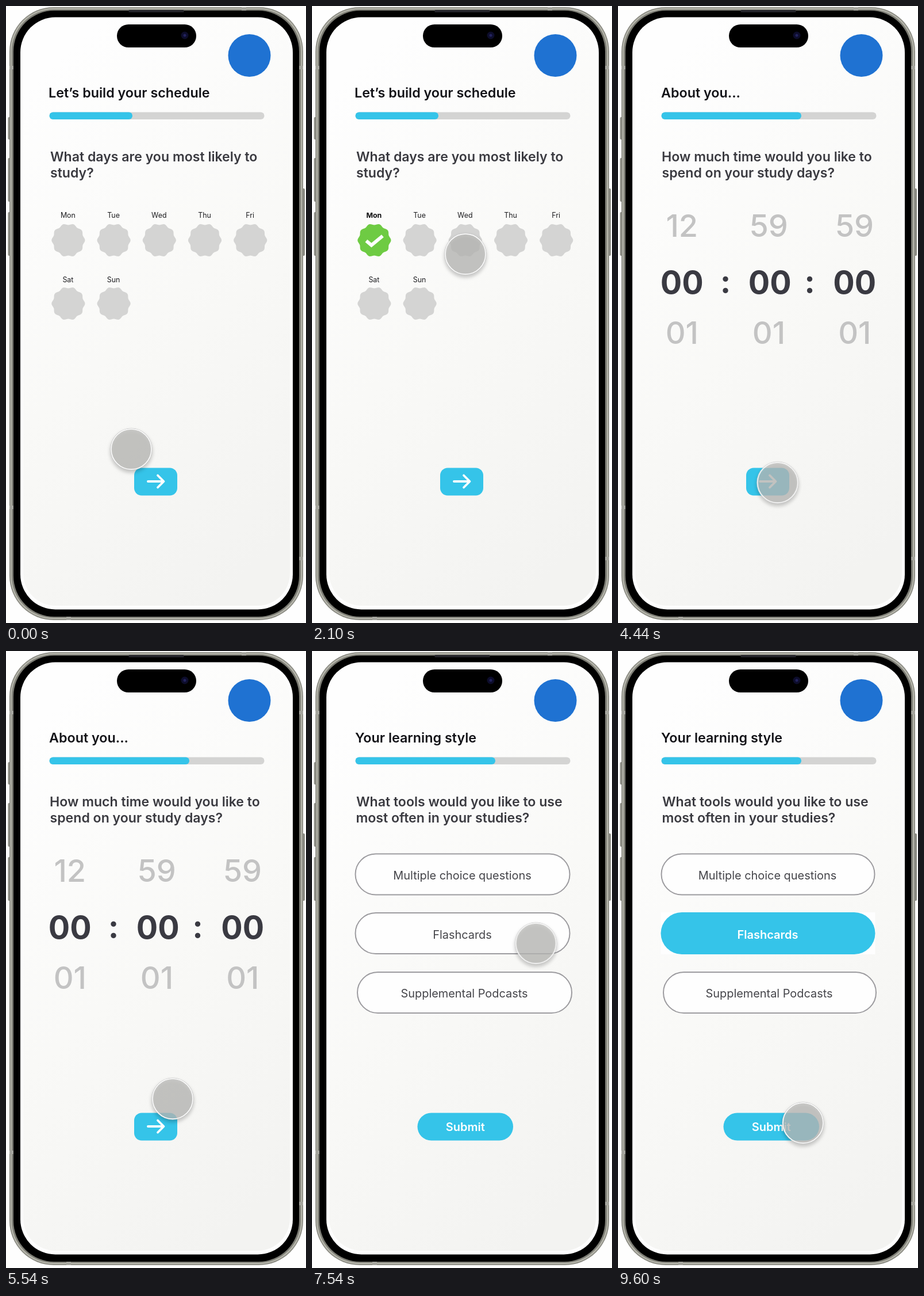
Animation, 522 px wide and 1072 px high, one loop 9.63 s. Source, as an HTML page:

```html
<!DOCTYPE html>
<html lang="en">
<head>
<meta charset="utf-8">
<title>Study planner</title>
<style>
  html, body { margin: 0; width: 100%; height: 100%; overflow: hidden; background: #fefefe; }
  svg { display: block; width: 100vw; height: 100vh; font-family: Inter, sans-serif; font-optical-sizing: none; }

  .title { font-size: 23.3px; font-weight: 600; fill: #121217; }
  .question { font-size: 23.1px; font-weight: 600; fill: #3a3a40; }
  .mid { text-anchor: middle; }
  .day { font-size: 12.4px; fill: #1d1d20; }
  .picked { font-weight: 700; fill: #0c0c0e; }
  .option { font-size: 19.9px; fill: #45454a; }
  .pill { fill: #fefefe; stroke: #9c9b9f; stroke-width: 2; }
  .strong { font-size: 20px; font-weight: 600; fill: #fff; }
  .now { font-size: 55.5px; font-weight: 650; fill: #3a3a42; }
  .near { font-size: 54px; font-weight: 500; fill: #c3c3c3; }
  .cyan { fill: #35c4e9; }
  .track { fill: #d4d4d3; }
  .tick, .arrow { fill: none; stroke: #fff; }
  .tick { stroke-width: 6; }
  .arrow { stroke-width: 3.8; stroke-linecap: round; stroke-linejoin: round; }

  .step { animation: 9630ms step-end infinite; }
  .until-mon { animation-name: until-mon; }
  .from-mon { animation-name: from-mon; }
  .until-wed { animation-name: until-wed; }
  .from-wed { animation-name: from-wed; }
  .days-page { animation-name: days-page; }
  .time-page { animation-name: time-page; }
  .tools-page { animation-name: tools-page; }
  .until-card { animation-name: until-card; }
  .from-card { animation-name: from-card; }
  @keyframes until-mon { 0% { opacity: 1 } 12.5%, 100% { opacity: 0 } }
  @keyframes from-mon { 0% { opacity: 0 } 12.5%, 100% { opacity: 1 } }
  @keyframes until-wed { 0% { opacity: 1 } 24.9%, 100% { opacity: 0 } }
  @keyframes from-wed { 0% { opacity: 0 } 24.9%, 100% { opacity: 1 } }
  @keyframes days-page { 0% { opacity: 1 } 40.5%, 100% { opacity: 0 } }
  @keyframes time-page { 0% { opacity: 0 } 40.5% { opacity: 1 } 64.4%, 100% { opacity: 0 } }
  @keyframes tools-page { 0% { opacity: 0 } 64.4%, 100% { opacity: 1 } }
  @keyframes until-card { 0% { opacity: 1 } 83.1%, 100% { opacity: 0 } }
  @keyframes from-card { 0% { opacity: 0 } 83.1%, 100% { opacity: 1 } }

  .cursor { animation: glide 9630ms ease-in-out infinite; filter: drop-shadow(0 4px 3px #0004); }
  @keyframes glide {
    0% { transform: translate(218px, 770px) }
    10.9%, 15.1% { transform: translate(112px, 424px) }
    21.8%, 27.5% { transform: translate(267px, 431px) }
    36.3%, 43.6% { transform: translate(276px, 835px) }
    54%, 59.2% { transform: translate(290px, 778px) }
    62.8%, 65.4% { transform: translate(272px, 826px) }
    69.6% { transform: translate(276px, 806px) }
    80%, 86.2% { transform: translate(396px, 491px) }
    96.6%, 100% { transform: translate(322px, 820px) }
  }
</style>
</head>
<body>
<svg viewBox="0 0 522 1072" preserveAspectRatio="none">
  <defs>
    <linearGradient id="paper" x1=".3" x2=".7" y2="1">
      <stop offset="0" stop-color="#fefefe"/><stop offset=".5" stop-color="#f9f9f7"/>
      <stop offset="1" stop-color="#f3f3f1"/>
    </linearGradient>
    <g id="next">
      <rect class="cyan" x="223" y="802.500" width="75" height="48" rx="13"/>
      <path class="arrow" d="M247 826H274M264 815.500L274.500 826L264 836.500"/>
    </g>
    <g id="tick">
      <use href="#flower" fill="#6ecb43"/>
      <path class="tick" d="M-14 1L-5 8.500L14.500 -7.500"/>
    </g>
    <path id="flower"/>
  </defs>

  <!-- phone -->
  <g fill="#8b8b83">
    <rect x="3.500" y="193" width="5" height="39" rx="2"/>
    <rect x="3.500" y="264" width="5" height="76" rx="2"/>
    <rect x="3.500" y="358" width="5" height="76" rx="2"/>
    <rect x="515" y="317" width="5" height="117" rx="2"/>
  </g>
  <rect x="6" y="2" width="511" height="1065" rx="77" fill="#85857d"/>
  <rect x="7.500" y="3.500" width="508" height="1062" rx="75.500" fill="#b4b4aa"/>
  <rect x="10" y="6" width="503" height="1057" rx="73" fill="#7d7d75"/>
  <path fill="#a5a59e" d="M6 104h8v6h-8zM6 868h8v6h-8zM509 104h8v6h-8zM509 957h8v6h-8zM410 2h8v7h-8zM105 1060h8v7h-8z"/>
  <rect x="13" y="8" width="497" height="1053" rx="71" fill="#000"/>
  <rect x="213" y="7" width="97" height="4" rx="2" fill="#24242a"/>
  <rect x="25" y="19.500" width="474" height="1029" rx="61" fill="#fefefe"/>
  <rect x="30" y="24" width="464" height="1018" rx="56" fill="url(#paper)"/>
  <rect x="193" y="32" width="138" height="40" rx="20" fill="#000"/>
  <circle cx="311" cy="51" r="6.500" fill="#0d0d2b"/>
  <circle cx="311" cy="51" r="2.500" fill="#22225c"/>
  <circle cx="423.500" cy="86" r="37" fill="#1f72d2"/>
  <rect class="track" x="75.500" y="184.500" width="374" height="12.500" rx="6.250"/>

  <g class="step days-page">
    <text class="title" x="74" y="159">Let’s build your schedule</text>
    <rect class="cyan" x="75.500" y="184.500" width="144.500" height="12.500" rx="6.250"/>
    <text class="question"><tspan x="77" y="270">What days are you most likely to</tspan><tspan x="77" y="298">study?</tspan></text>
    <g id="days"></g>
    <use href="#next"/>
  </g>

  <g class="step time-page">
    <text class="title" x="75" y="159">About you...</text>
    <rect class="cyan" x="75.500" y="184.500" width="243.500" height="12.500" rx="6.250"/>
    <text class="question"><tspan x="76" y="270">How much time would you like to</tspan><tspan x="76.500" y="298">spend on your study days?</tspan></text>
    <g id="wheels" class="mid"></g>
    <use href="#next"/>
  </g>

  <g class="step tools-page">
    <text class="title" x="75" y="159">Your learning style</text>
    <rect class="cyan" x="75.500" y="184.500" width="243.500" height="12.500" rx="6.250"/>
    <text class="question"><tspan x="77" y="270">What tools would you like to use</tspan><tspan x="76.500" y="298">most often in your studies?</tspan></text>
    <g class="step until-card mid option">
      <rect class="pill" x="75.500" y="352.500" width="373" height="71" rx="35.500"/>
      <text x="261.500" y="397">Multiple choice questions</text>
      <rect class="pill" x="75.500" y="455" width="373" height="71" rx="35.500"/>
      <text x="261.500" y="499.500">Flashcards</text>
      <rect class="pill" x="79" y="558" width="373" height="71" rx="35.500"/>
      <text x="265" y="602">Supplemental Podcasts</text>
    </g>
    <g class="step from-card mid option">
      <rect class="pill" x="75.500" y="352.500" width="371" height="71" rx="35.500"/>
      <text x="260" y="397">Multiple choice questions</text>
      <rect x="74.500" y="454" width="373" height="73" fill="#fefefe"/>
      <rect class="cyan" x="74.500" y="454" width="373" height="73" rx="36.500"/>
      <text class="strong" x="260.500" y="499.500">Flashcards</text>
      <rect class="pill" x="79" y="558" width="370" height="71" rx="35.500"/>
      <text x="263" y="602">Supplemental Podcasts</text>
    </g>
    <rect class="cyan" x="183.500" y="802.500" width="166.500" height="48" rx="24"/>
    <text class="strong mid" x="266.700" y="834">Submit</text>
  </g>

  <g class="cursor">
    <circle r="36" fill="#bfbfbc" fill-opacity=".74"/>
    <circle r="36" fill="none" stroke="#c4c4c4" stroke-width="1"/>
    <circle r="35" fill="none" stroke="#fff" stroke-width="1.500"/>
  </g>
</svg>
<script>
  const byId = id => document.getElementById(id);

  // Ten-lobed rounded badge with a notch at the top
  const outline = Array.from({ length: 120 }, (_, i) => {
    const angle = i * Math.PI / 60;
    const radius = 27.8 - 1.3 * Math.cos(10 * angle);
    return `${(radius * Math.sin(angle)).toFixed(2)} ${(-radius * Math.cos(angle)).toFixed(2)}`;
  });
  byId('flower').setAttribute('d', `M${outline.join('L')}Z`);

  const label = (name, x, y, style = '') => `<text class="day mid ${style}" x="${x}" y="${y}">${name}</text>`;
  const badge = (id, x, y) => `<use href="#${id}" x="${x}" y="${y}" fill="#d4d4d3"/>`;

  byId('days').innerHTML = ['Mon', 'Tue', 'Wed', 'Thu', 'Fri', 'Sat', 'Sun'].map((name, i) => {
    const row = Math.floor(i / 5);
    const x = 108.4 + (i % 5) * 79.2;
    const y = 407 + row * 110;
    const textX = x - 0.5;
    const textY = 368 + row * 111.5;
    const plain = label(name, textX, textY) + badge('flower', x, y);
    if (name !== 'Mon' && name !== 'Wed') return plain;
    const key = name.toLowerCase();
    return `<g class="step until-${key}">${plain}</g>
      <g class="step from-${key}">${label(name, textX, textY, 'picked')}${badge('tick', x, y)}</g>`;
  }).join('');

  const digits = (style, value, x, y) => `<text class="${style}" x="${x}" y="${y}">${value}</text>`;
  byId('wheels').innerHTML = [[111.3, '12'], [262.5, '59'], [411.8, '59']].map(([x, before]) =>
    digits('near', before, x, 400.5) + digits('near', '01', x, 586.5)
  ).join('') + [111.3, 264.3, 411.8].map(x => digits('now', '00', x, 500)).join('')
    + [187, 333.5].map(x => digits('now', ':', x, 498)).join('');
</script>
</body>
</html>
```
